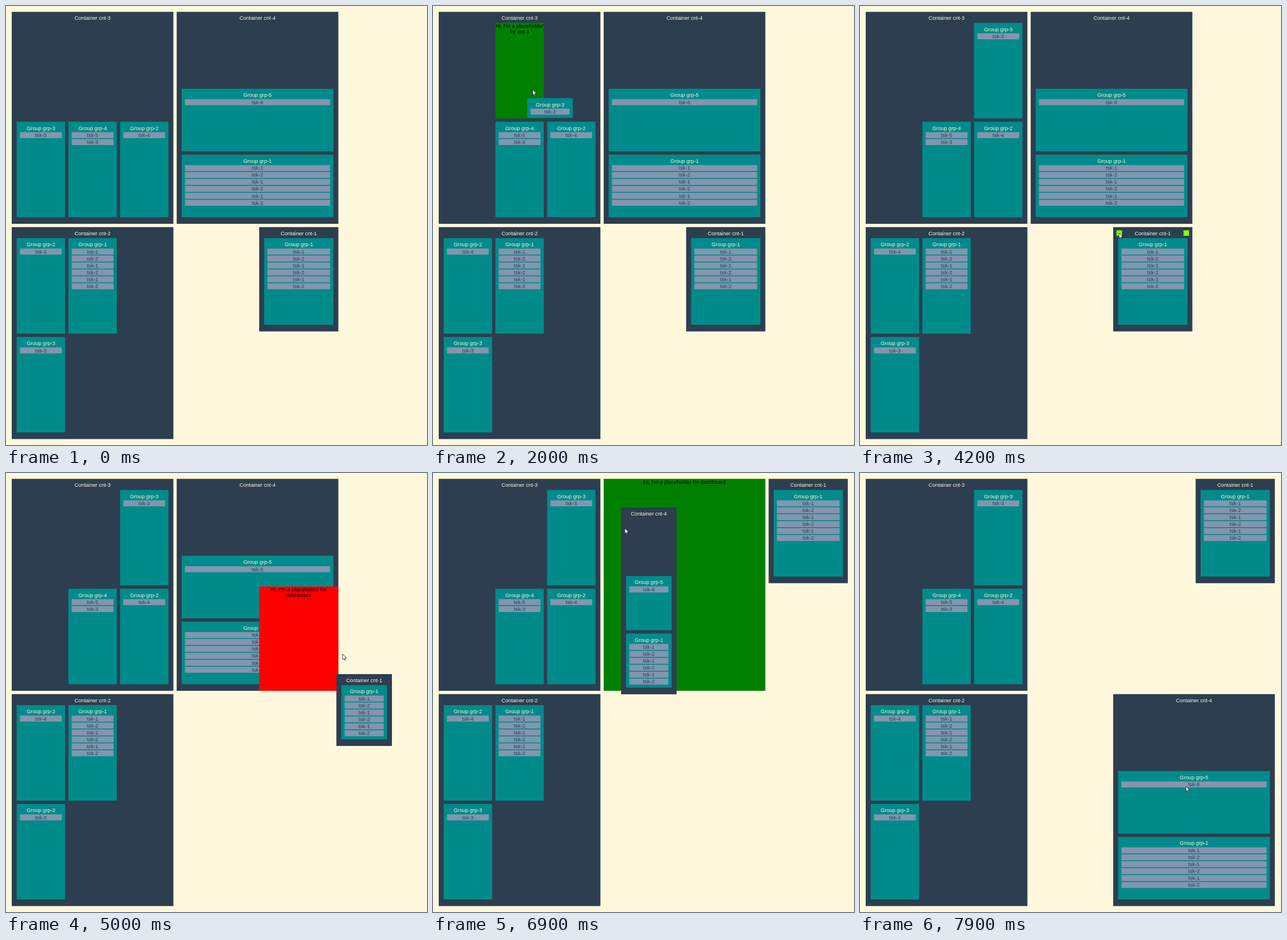
Animation of 733x764 px, one loop 8 s. Source, as an HTML page with a canvas:

```html
<!DOCTYPE html>
<html lang="en">
<head>
<meta charset="utf-8">
<title>Nested drag and drop grid</title>
<style>
html, body { margin: 0; width: 100%; height: 100%; overflow: hidden; background: #fff8dc; }
canvas { display: block; }
</style>
</head>
<body>
<canvas id="stage" width="733" height="764"></canvas>
<script>
const ctx = document.getElementById('stage').getContext('2d');
const LOOP = 8000, TICK = 100, GHOST_LAG = 70;
const GAP = 5.75, LINE = 10.4, TASK_STEP = 12.07, TASK_TOP = 18.2;
const SIDE = 8.6, HEAD = 19.2, FOOT = 11.5;
const ORIGIN = { x: 10, y: 10.2 }, CELL = { x: 143.6, y: 187.3 };
const COLOR = {
  page: '#fff8dc', box: '#2c3e50', group: '#008b8b', task: '#8395af',
  handle: '#7fff00', ok: '#008000', bad: '#ff0000'
};

const group = (n, tasks, col, row) => ({ title: 'Group grp-' + n, tasks, col, row });
const container = (n, col, row, span, cols, rows, groups) =>
  ({ title: 'Container cnt-' + n, col, row, span, cols, rows, groups });
const PAIRS = [1, 2, 1, 2, 1, 2];

// Pointer path: time, x, y
const PATH = [
  [200, 118, 0], [600, 70, 110], [1000, 31, 211], [1100, 30, 213], [1200, 31, 213], [1300, 31, 213],
  [1330, 38, 211], [1400, 52.5, 208], [1800, 130, 165], [2130, 201.7, 133], [2300, 236, 128],
  [2700, 236, 128], [3200, 250, 140], [3300, 250, 140], [3800, 360, 290], [4200, 451, 395],
  [4270, 453, 394], [4700, 520, 385], [4930, 569.5, 342], [5000, 586, 315], [5100, 612, 273],
  [5200, 612, 273], [5500, 630, 110], [5600, 630, 110], [6000, 298.7, 23.5], [6100, 305, 21],
  [6200, 305, 21], [6700, 312, 35], [6830, 321.7, 52], [6900, 334, 96], [7030, 365, 281],
  [7100, 385, 315], [7600, 567.5, 545]
];

function pointerAt(t) {
  const i = PATH.findIndex(p => p[0] > t);
  if (i === 0) return { x: PATH[0][1], y: PATH[0][2] };
  if (i < 0) { const p = PATH[PATH.length - 1]; return { x: p[1], y: p[2] }; }
  const [t0, x0, y0] = PATH[i - 1], [t1, x1, y1] = PATH[i];
  const k = (t - t0) / (t1 - t0);
  return { x: x0 + (x1 - x0) * k, y: y0 + (y1 - y0) * k };
}

function rect(r, color) {
  ctx.fillStyle = color;
  ctx.fillRect(r.x, r.y, r.w, r.h);
}

function label(text, r, baseline, color) {
  ctx.fillStyle = color;
  ctx.fillText(text, r.x + r.w / 2, r.y + baseline);
}

const inside = (p, r) => p.x >= r.x && p.x < r.x + r.w && p.y >= r.y && p.y < r.y + r.h;

function drawHandles(r) {
  const size = 9.6;
  for (const x of [r.x + GAP, r.x + r.w - GAP - size])
    rect({ x, y: r.y + 5.6, w: size, h: size }, COLOR.handle);
}

function drawGroup(g, r, hover) {
  rect(r, COLOR.group);
  label(g.title, r, 14.2, COLOR.page);
  g.tasks.forEach((n, i) => {
    const bar = { x: r.x + GAP, y: r.y + TASK_TOP + i * TASK_STEP, w: r.w - 2 * GAP, h: LINE };
    rect(bar, COLOR.task);
    label('tsk-' + n, bar, 8.4, COLOR.box);
  });
  if (hover && inside(hover, r)) drawHandles(r);
}

function groupRect(c, r, col, row) {
  const dx = (r.w - 2 * SIDE + GAP) / c.cols;
  const dy = (r.h - HEAD - FOOT + GAP) / c.rows;
  return { x: r.x + SIDE + col * dx, y: r.y + HEAD + row * dy, w: dx - GAP, h: dy - GAP };
}

function drawContainer(c, r, hover, skip) {
  rect(r, COLOR.box);
  label(c.title, r, 14.2, COLOR.page);
  if (hover && inside(hover, r)) drawHandles(r);
  for (const g of c.groups)
    if (g !== skip) drawGroup(g, groupRect(c, r, g.col, g.row), hover);
}

const cellRect = (col, row, span) => ({
  x: ORIGIN.x + col * CELL.x, y: ORIGIN.y + row * CELL.y,
  w: span * CELL.x - GAP, h: span * CELL.y - GAP
});

function drawPlaceholder(r, free, lines) {
  rect(r, free ? COLOR.ok : COLOR.bad);
  lines.forEach((text, i) => label(text, r, 8.4 + i * LINE, '#000'));
}

function drawPointer(p) {
  ctx.save();
  ctx.translate(p.x, p.y);
  ctx.beginPath();
  [[0, 0], [0, 9.6], [2.2, 7.6], [3.6, 10.8], [5.1, 10.2], [3.7, 7], [6.7, 7]]
    .forEach(([x, y]) => ctx.lineTo(x, y));
  ctx.closePath();
  ctx.fillStyle = '#fff';
  ctx.fill();
  ctx.lineWidth = 0.7;
  ctx.strokeStyle = '#000';
  ctx.stroke();
  ctx.restore();
}

const overlaps = (a, b, sa, sb) =>
  a.col < b.col + sb && b.col < a.col + sa && a.row < b.row + sb && b.row < a.row + sa;

function drawScene(t) {
  const movedGroup = t >= 2700 ? group(3, [3], 2, 0) : group(3, [3], 0, 1);
  const c3 = container(3, 0, 0, 2, 3, 2, [movedGroup, group(4, [5, 3], 1, 1), group(2, [4], 2, 1)]);
  const c4 = container(4, ...(t >= 7900 ? [3, 2] : [2, 0]), 2, 1, 3,
    [group(5, [6], 0, 1), group(1, PAIRS, 0, 2)]);
  const c2 = container(2, 0, 2, 2, 3, 2,
    [group(2, [4], 0, 0), group(1, PAIRS, 1, 0), group(3, [3], 0, 1)]);
  const c1 = container(1, ...(t >= 5600 ? [4, 0] : [3, 2]), 1, 1, 1, [group(1, PAIRS, 0, 0)]);
  const all = [c3, c4, c2, c1];

  const during = (a, b) => t >= a && t < b;
  const dragGroup = during(1400, 2700) ? movedGroup : null;
  const dragBox = during(4300, 5600) ? c1 : during(6300, 7900) ? c4 : null;
  const justDropped = during(2700, 2800) || during(5600, 5700) || t >= 7900;
  const pointer = pointerAt(t);
  const hover = t < 200 || dragGroup || dragBox || justDropped ? null : pointer;
  const late = pointerAt(t - GHOST_LAG);
  const ghost = { x: late.x + 5.75, y: late.y + 8 };

  rect({ x: 0, y: 0, w: 733, h: 764 }, COLOR.page);
  for (const c of all)
    if (c !== dragBox) drawContainer(c, cellRect(c.col, c.row, c.span), hover, dragGroup);

  if (dragGroup) {
    const home = cellRect(c3.col, c3.row, c3.span);
    const first = groupRect(c3, home, 0, 0);
    const spot = {
      col: Math.floor((ghost.x - first.x) / (first.w + GAP)),
      row: Math.floor((ghost.y - first.y) / (first.h + GAP))
    };
    const free = !c3.groups.some(g => g !== dragGroup && overlaps(spot, g, 1, 1));
    drawPlaceholder(groupRect(c3, home, spot.col, spot.row), free,
      ["Hi, I'm a placeholder", 'for cnt-3']);
    drawGroup(dragGroup, { ...ghost, w: 79.5, h: 34.3 });
  }

  if (dragBox) {
    const spot = {
      col: Math.floor((ghost.x - ORIGIN.x) / CELL.x),
      row: Math.floor((ghost.y - ORIGIN.y) / CELL.y)
    };
    const free = !all.some(c => c !== dragBox && overlaps(spot, c, dragBox.span, c.span));
    const lines = dragBox.span > 1
      ? ["Hi, I'm a placeholder for dashboard"]
      : ["Hi, I'm a placeholder for", 'dashboard'];
    drawPlaceholder(cellRect(spot.col, spot.row, dragBox.span), free, lines);
    const h = HEAD + FOOT - GAP + dragBox.rows * (94.3 + GAP);
    drawContainer(dragBox, { ...ghost, w: 96.7, h });
  }

  if (t >= 200) drawPointer(pointer);
}

ctx.font = '9.2px "Liberation Sans", Arial, sans-serif';
ctx.textAlign = 'center';
const start = performance.now();
function frame() {
  const t = (performance.now() - start) % LOOP;
  drawScene(Math.floor(t / TICK) * TICK);
  requestAnimationFrame(frame);
}
frame();
</script>
</body>
</html>
```
